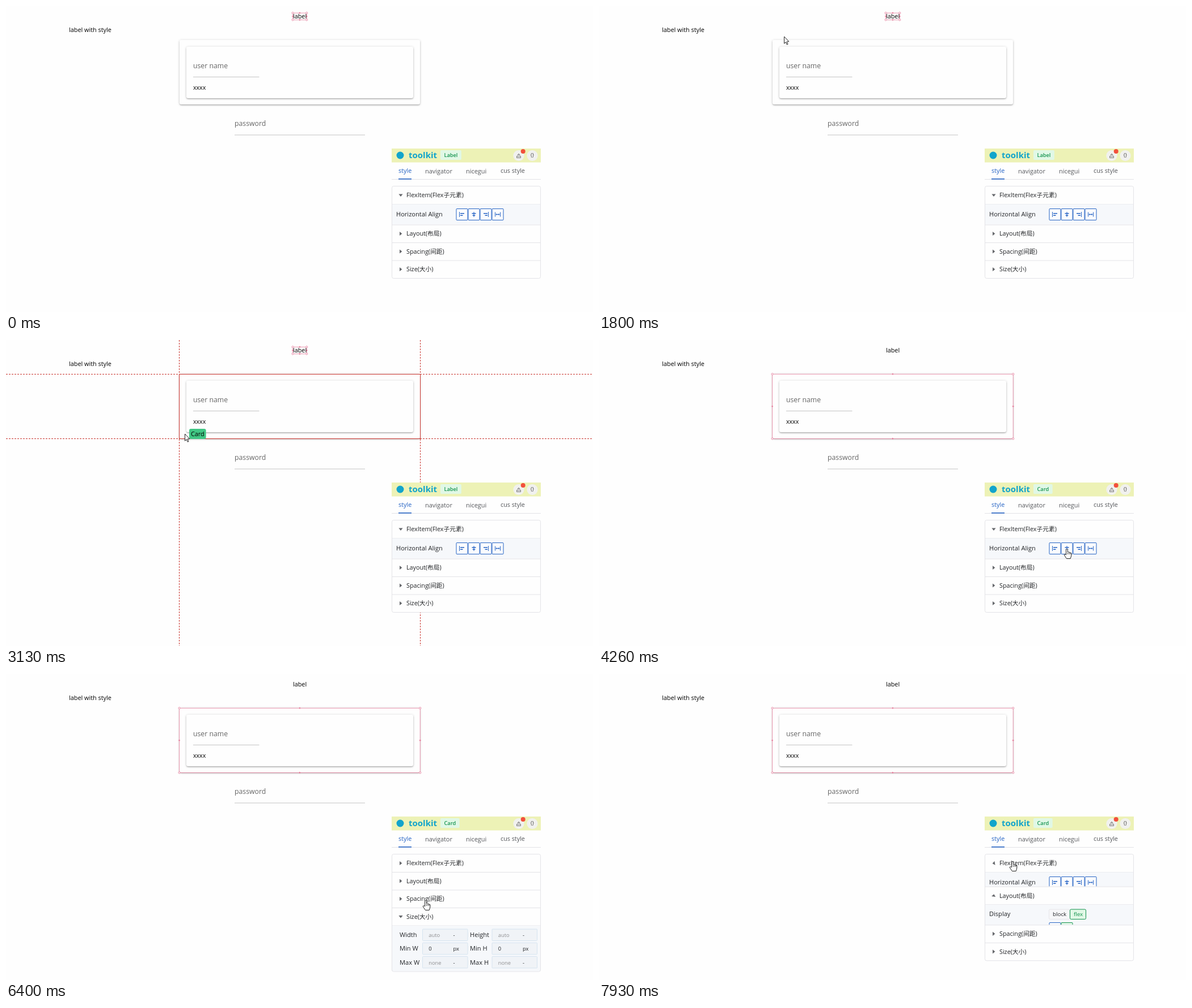
An HTML page with a canvas for the animation above (8 s loop, 1035 by 541 pixels).

```html
<!DOCTYPE html>
<html lang="en">
<head>
<meta charset="utf-8">
<title>Style toolkit</title>
<style>
html, body { margin: 0; width: 100%; height: 100%; overflow: hidden; background: #fefefe; }
canvas { display: block; width: 1035px; height: 541px; }
</style>
</head>
<body>
<canvas id="stage"></canvas>
<script>
const W = 1035, H = 541, LOOP = 8000;
const PAGE = '#fefefe', INK = '#222427', BLUE = '#2563c4', GREEN = '#12924d',
      LINE = '#e3e3e7', RED = '#c9342e', PINK = '#e67f9d';
const SANS = '"Open Sans", "Noto Sans", "Noto Sans CJK SC", "Noto Sans CJK", sans-serif';

const canvas = document.getElementById('stage');
const c = canvas.getContext('2d');
const dpr = window.devicePixelRatio || 1;
canvas.width = W * dpr;
canvas.height = H * dpr;

// pointer path: time, x, y
const PATH = [
  [330, -12, 62], [600, 70, 50], [800, 130, 42], [1130, 170, 46], [1260, 172, 46],
  [1460, 326, 54], [1800, 326, 54], [2080, 352, 72], [2330, 444, 99], [2400, 474, 108],
  [2600, 514, 122], [2660, 514, 122], [3050, 315, 166], [3800, 315, 166], [4190, 825, 369],
  [4330, 825, 369], [4600, 838, 386], [4660, 838, 386], [5200, 729, 329], [5400, 729, 329],
  [5840, 736, 460], [6000, 736, 460], [6260, 742, 426], [6390, 740, 400], [6660, 740, 400],
  [6850, 738, 360], [7530, 738, 360], [7700, 729, 331]
];

// hoverable page elements, innermost first
const TARGETS = [
  { name: 'Label', x: 506, y: 12, w: 24, h: 12 },
  { name: 'Label', x: 111, y: 36, w: 75, h: 12 },
  { name: 'Label', x: 330, y: 138, w: 22, h: 12 },
  { name: 'Input', x: 330, y: 84, w: 116, h: 42 },
  { name: 'Input', x: 403, y: 186, w: 230, h: 42 },
  { name: 'Card', x: 318, y: 72, w: 400, h: 91 },
  { name: 'Card', x: 306, y: 60, w: 424, h: 114 }
];
const TITLE = TARGETS[0], CARD = TARGETS[6];

// accordion
const HEAD = 31.5, OPEN_TIME = 330;
const SECTIONS = [
  { title: 'FlexItem(Flex子元素)', full: 36.5, body: flexBody },
  { title: 'Layout(布局)', full: 121, body: layoutBody },
  { title: 'Spacing(间距)', full: 0 },
  { title: 'Size(大小)', full: 81, body: sizeBody }
];
const SWITCHES = [
  { at: 5900, from: 0, to: 3 },
  { at: 6900, from: 3, to: 1 },
  { at: 7700, from: 1, to: 0 }
];

function text(s, x, mid, size = 10.8, color = INK, weight = 400) {
  c.font = `${weight} ${size}px ${SANS}`;
  c.fillStyle = color;
  c.fillText(s, x, mid + size * 0.37);
}

function textWidth(s, size, weight = 400) {
  c.font = `${weight} ${size}px ${SANS}`;
  return c.measureText(s).width;
}

function box(x, y, w, h, r, fill, stroke) {
  c.beginPath();
  c.roundRect(x, y, w, h, r);
  if (fill) { c.fillStyle = fill; c.fill(); }
  if (stroke) { c.strokeStyle = stroke; c.lineWidth = 1; c.stroke(); }
}

function line(color, width, ...p) {
  c.beginPath();
  for (let i = 0; i < p.length; i += 2) c.lineTo(p[i], p[i + 1]);
  c.strokeStyle = color;
  c.lineWidth = width;
  c.stroke();
}

function dot(x, y, r, fill, stroke) {
  c.beginPath();
  c.arc(x, y, r, 0, 7);
  c.fillStyle = fill;
  c.fill();
  if (stroke) { c.strokeStyle = stroke; c.lineWidth = 0.9; c.stroke(); }
}

function poly(p, fill, stroke) {
  c.beginPath();
  for (let i = 0; i < p.length; i += 2) c.lineTo(p[i], p[i + 1]);
  c.closePath();
  c.fillStyle = fill;
  c.fill();
  if (stroke) { c.strokeStyle = stroke; c.lineWidth = 1; c.stroke(); }
}

function card({ x, y, w, h }) {
  for (const [dy, blur, alpha] of [[0.8, 4, 0.2], [1.6, 1.6, 0.2]]) {
    c.save();
    c.shadowColor = `rgba(0,0,0,${alpha})`;
    c.shadowBlur = blur * dpr;
    c.shadowOffsetY = dy * dpr;
    box(x, y, w, h, 3, PAGE);
    c.restore();
  }
}

function page() {
  c.fillStyle = PAGE;
  c.fillRect(0, 0, W, H);
  card(CARD);
  card(TARGETS[5]);
  text('label with style', 111, 42, 10.85, '#000');
  text('user name', 330, 105.5, 12.25, '#666');
  line('#c4c4c4', 1, 330, 125.5, 446.5, 125.5);
  text('xxxx', 330, 144, 10.6, '#000');
  text('password', 403, 207.5, 12.25, '#666');
  line('#c4c4c4', 1, 403, 228, 633, 228);
}

function selection({ x, y, w, h }) {
  const x0 = x - 0.4, y0 = y + 0.3, x1 = x + w + 0.2, y1 = y + h + 0.4;
  const cx = (x0 + x1) / 2, cy = (y0 + y1) / 2;
  c.strokeStyle = PINK;
  c.lineWidth = 0.8;
  c.strokeRect(x0, y0, x1 - x0, y1 - y0);
  for (const [px, py] of [[cx, y0], [cx, y1], [x0, cy], [x1, cy]]) dot(px, py, 1.3, PINK);
  for (const px of [x0, x1]) for (const py of [y0, y1]) dot(px, py, 1.6, '#fff', PINK);
}

function hover(el, px, py) {
  const x0 = el.x - 0.5, y0 = el.y + 0.5, x1 = el.x + el.w + 0.5, y1 = el.y + el.h + 0.5;
  c.setLineDash([3, 2]);
  for (const x of [x0, x1]) line(RED, 1, x, 0, x, H);
  for (const y of [y0, y1]) line(RED, 1, 0, y, W, y);
  c.setLineDash([]);
  c.strokeStyle = RED;
  c.lineWidth = 1;
  c.strokeRect(x0, y0, x1 - x0, y1 - y0);
  const w = textWidth(el.name, 10.8) + 6;
  box(px + 8, py - 9, w, 18, 3, '#40c684');
  text(el.name, px + 11, py, 10.8, '#000');
}

function alignIcon(kind, x, y, color) {
  if (kind === 3) {
    line(color, 1, x - 4.5, y - 4, x - 4.5, y + 4);
    line(color, 1, x + 4.5, y - 4, x + 4.5, y + 4);
    line(color, 1, x - 3, y, x + 3, y);
    poly([x - 3.5, y, x - 1.5, y - 2, x - 1.5, y + 2], color);
    poly([x + 3.5, y, x + 1.5, y - 2, x + 1.5, y + 2], color);
    return;
  }
  const side = kind - 1;
  line(color, 1, x + side * 4.5, y - 4.5, x + side * 4.5, y + 4.5);
  for (const [dy, len] of [[-1.7, 7], [1.7, 4.5]]) {
    const left = side < 0 ? x - 3 : side > 0 ? x + 3 - len : x - len / 2;
    line(color, 1.4, left, y + dy, left + len, y + dy);
  }
}

function iconRow(y, count, active = -1) {
  for (let i = 0; i < count; i++) {
    const on = i === active, color = on ? GREEN : BLUE;
    box(794 + 21 * i, y + 0.5, 20, 20, 1, on ? '#e3f8e8' : '#fbfcfe', color);
    alignIcon(i, 804 + 21 * i, y + 10.5, color);
  }
}

function flexBody(y) {
  text('Horizontal Align', 688, y + 18, 11.05);
  iconRow(y + 8, 4);
}

function layoutBody(y) {
  text('Display', 688, y + 17, 11.05);
  box(793.5, y + 9, 36.5, 17.5, 2, '#f7f7f9', '#e6e6ea');
  text('block', 800, y + 17.5, 9.8);
  box(830.5, y + 9, 28, 17.5, 2, '#e1f8e6', GREEN);
  text('flex', 837, y + 17.5, 9.8, GREEN);
  ['Direction', 'Justify', 'Align'].forEach((name, i) => {
    const top = y + 32 + 28 * i;
    text(name, 688, top + 10.5, 11.05);
    iconRow(top, i ? 4 : 2, i ? -1 : 1);
  });
}

function sizeBody(y) {
  const rows = [['Width', 'Height', 'auto', '-'], ['Min W', 'Min H', '0', 'px'], ['Max W', 'Max H', 'none', '-']];
  rows.forEach(([a, b, value, unit], i) => {
    const mid = y + 16.5 + 24.2 * i;
    [[a, 694, 734.5], [b, 818, 857]].forEach(([name, lx, fx]) => {
      text(name, lx, mid, 11.1);
      box(fx, mid - 10, 79.5, 20.5, 1, '#f0f3f7', '#d6e4f0');
      text(value, fx + 10.8, mid + 0.8, 9.3, value === '0' ? INK : '#8e8e90');
      text(unit, fx + 54, mid + 0.8, 9.3);
    });
  });
}

// how far each section is open, 0 to 1
function openState(t) {
  const open = [1, 0, 0, 0];
  for (const s of SWITCHES) {
    if (t < s.at) break;
    const p = Math.min(1, (t - s.at) / OPEN_TIME);
    open[s.from] = 1 - p;
    open[s.to] = p;
  }
  return open;
}

function arrow(x, y, open) {
  c.save();
  c.translate(x, y);
  c.rotate(-open * Math.PI * 1.5);
  poly([-2, -3.6, 2.4, 0, -2, 3.6], '#66686c');
  c.restore();
}

function accordion(t) {
  const open = openState(t);
  const top = 319;
  const bottom = SECTIONS.reduce((y, s, i) => y + HEAD + s.full * open[i], top);
  box(680, top - 12, 263, bottom - top + 12, 0, PAGE);
  let y = top;
  SECTIONS.forEach((s, i) => {
    if (i) line(LINE, 1, 680.5, y, 943, y);
    arrow(696, y + 15.5, open[i]);
    text(s.title, 706, y + 15.5, 10.75);
    y += HEAD;
    const h = s.full * open[i];
    if (h > 0) {
      c.save();
      c.beginPath();
      c.rect(680.5, y - 0.5, 262.5, h);
      c.clip();
      c.fillStyle = '#f6f8fb';
      c.fillRect(680, y - 0.5, 263, h);
      line(LINE, 1, 680, y - 0.5, 943, y - 0.5);
      s.body(y - 0.5);
      c.restore();
    }
    y += h;
  });
  box(680.5, top - 0.5, 262, bottom - top + 0.5, 3, null, LINE);
}

function panel(t, chip) {
  box(680, 252, 263, 56, 0, PAGE);
  box(680, 252, 263, 24.5, 0, '#edf2b6');
  dot(695, 264, 6.5, '#12a4cb');
  text('toolkit', 710, 263.5, 15, '#12a4cb', 700);
  box(766, 255, textWidth(chip, 9.2, 600) + 13, 17, 2, '#e1f8e6');
  text(chip, 772.5, 263.5, 9.2, GREEN, 600);

  dot(904, 264.5, 9.6, '#f1f1ef');
  line('#666', 0.8, 901.5, 264.5, 900.5, 266, 900.5, 268.5, 907.5, 268.5, 907.5, 266, 906.5, 264.5);
  line('#666', 0.8, 900.5, 266.2, 907.5, 266.2);
  line('#666', 0.8, 902, 263.5, 904, 261, 906, 263.5, 902, 263.5);
  dot(911.7, 257, 4, '#f2503b');
  dot(928, 264.5, 9.6, '#f1f1ef');
  text('{}', 924.6, 264, 8.6, '#444', 400);

  text('style', 692, 291.5, 10.8, BLUE);
  text('navigator', 739, 291.5, 10.9, '#55575b');
  text('nicegui', 811, 291.5, 10.95, '#55575b');
  text('cus style', 872, 291.5, 10.8, '#55575b');
  line(LINE, 1, 680, 306.5, 943, 306.5);
  line(BLUE, 1.6, 692, 305.8, 715, 305.8);
  accordion(t);
}

function pointer(t) {
  if (t < PATH[0][0]) return null;
  const i = PATH.findIndex(k => k[0] > t);
  if (i < 0) return PATH[PATH.length - 1].slice(1);
  const [t0, x0, y0] = PATH[i - 1], [t1, x1, y1] = PATH[i];
  const p = (t - t0) / (t1 - t0);
  return [x0 + (x1 - x0) * p, y0 + (y1 - y0) * p];
}

function arrowCursor() {
  poly([0.5, 0, 0.5, 12.3, 3.2, 9.8, 5.2, 14.2, 7, 13.4, 5, 9, 8.8, 8.8], '#fff', '#222');
}

function handCursor() {
  c.beginPath();
  c.moveTo(-1.4, 10);
  c.lineTo(-1.4, 1.4);
  c.quadraticCurveTo(0, -0.8, 1.4, 1.4);
  c.lineTo(1.4, 6);
  c.quadraticCurveTo(2.8, 5, 3.9, 6.4);
  c.quadraticCurveTo(5.2, 5.6, 6, 7.2);
  c.quadraticCurveTo(8, 6.8, 8, 9);
  c.lineTo(7.6, 13);
  c.lineTo(6.2, 17.5);
  c.lineTo(-0.6, 17.5);
  c.lineTo(-4.8, 11);
  c.quadraticCurveTo(-4.6, 8.4, -1.4, 10.8);
  c.closePath();
  c.fillStyle = '#fff';
  c.fill();
  c.strokeStyle = '#222';
  c.lineWidth = 1;
  c.stroke();
  for (const x of [1.4, 3.9, 6]) line('#222', 0.8, x, 7, x, 10);
}

function draw(t) {
  c.setTransform(dpr, 0, 0, dpr, 0, 0);
  const picked = t >= 3460 ? CARD : TITLE;
  page();
  selection(picked);
  text('label', 506, 18, 10.8, '#000');

  // the hover outline trails the pointer slightly
  const late = pointer(t - 70);
  if (late) {
    const [x, y] = late;
    const el = TARGETS.find(e => x >= e.x && x <= e.x + e.w && y >= e.y && y <= e.y + e.h);
    if (el) hover(el, x, y);
  }
  panel(t, picked.name);

  const pos = pointer(t);
  if (pos) {
    c.save();
    c.translate(...pos);
    if (pos[0] > 680 && pos[1] > 319) handCursor();
    else arrowCursor();
    c.restore();
  }
}

function tick() {
  draw(performance.now() % LOOP);
  requestAnimationFrame(tick);
}
tick();
</script>
</body>
</html>
```
